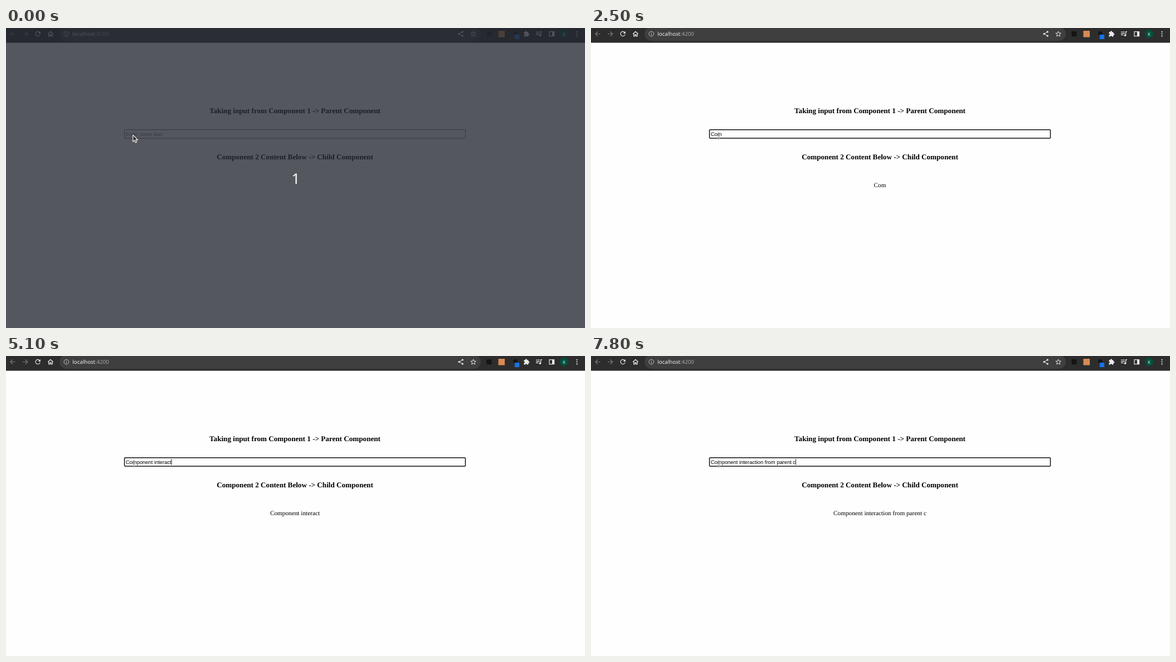
These frames come from a looping animation (1039 by 539 pixels, 8 s). An HTML page:

```html
<!DOCTYPE html>
<html lang="en">
<head>
<meta charset="utf-8">
<title>Component interaction</title>
<style>
html, body { margin: 0; width: 100%; height: 100%; overflow: hidden; background: #fefefe; }
svg { display: block; width: 1039px; height: 539px; }
text { text-rendering: geometricPrecision; white-space: pre; }
.head { font: bold 13.15px "Liberation Serif", "Times New Roman", serif; text-anchor: middle; }
.field { font: 9.38px "Liberation Sans", Arial, sans-serif; }
.copy { font: 11.26px "Liberation Serif", "Times New Roman", serif; text-anchor: middle; }
.ui { font-family: "Noto Sans", "Open Sans", sans-serif; }
.line { fill: none; stroke: #ececec; stroke-width: 1.2; }
.dim { stroke: #7b7b7b; }
.solid { fill: #ececec; }
</style>
</head>
<body>
<svg viewBox="0 0 1039 539" xmlns="http://www.w3.org/2000/svg">
  <rect width="1039" height="539" fill="#fefefe"/>

  <!-- toolbar -->
  <rect width="1039" height="26.5" fill="#2d2d2d"/>
  <rect x="96" y="-2" width="756" height="25" rx="12.5" fill="#3f3f3f"/>
  <path class="line dim" d="M16.5 10.5H8M12 6.5L8 10.5L12 14.5"/>
  <path class="line dim" d="M30 10.5H38.7M34.7 6.5L38.7 10.5L34.7 14.5"/>
  <path class="line" d="M60.7 8.4A4.1 4.1 0 1 0 61.1 11.6"/>
  <path class="solid" d="M61.8 5.8V10H57.6Z"/>
  <path class="line" d="M75.2 10.8L79.9 6.3L84.6 10.8M76.7 10V14.7H78.9V11.8H80.9V14.7H83.1V10"/>
  <g class="line" style="stroke:#c4c4c4;stroke-width:1">
    <circle cx="108.3" cy="10.6" r="4.3"/>
    <path d="M108.3 10V13M108.3 8V9"/>
  </g>
  <text class="ui" x="119.3" y="14" font-size="9.66" fill="#eeeeee">localhost<tspan fill="#a6a6a6">:4200</tspan></text>

  <path class="line" style="stroke-width:1" d="M819 7L813.3 10.5L819 14"/>
  <g class="solid">
    <circle cx="819.2" cy="6.9" r="1.6"/>
    <circle cx="813" cy="10.5" r="1.6"/>
    <circle cx="819.2" cy="14.1" r="1.6"/>
  </g>
  <path id="star" class="line" style="stroke-width:1;stroke-linejoin:round"/>

  <rect x="862.5" y="6" width="9" height="9" fill="#141414"/>
  <rect x="883.5" y="5" width="11.5" height="11.5" fill="#d98a55"/>
  <circle cx="914" cy="9.5" r="3.8" fill="#141414"/>
  <rect x="912.8" y="12" width="8.4" height="8" rx="1" fill="#1a73e8"/>

  <path class="solid" d="M929.4 7.2H932V6.6A1.4 1.4 0 0 1 934.8 6.6V7.2H937.4V9.8H938A1.4 1.4 0 0 1 938 12.6H937.4V15.4H934.9A1.5 1.5 0 0 0 931.9 15.4H929.4V12.8A1.5 1.5 0 0 0 929.4 9.8Z"/>
  <path class="line" d="M951 7H958M951 9.7H958M951 12.4H955.4M959.7 13.2V6.6H962"/>
  <circle class="solid" cx="958.4" cy="13.3" r="1.7"/>
  <rect class="line" x="975" y="6.6" width="8.6" height="8"/>
  <rect class="solid" x="980" y="6.6" width="3.6" height="8"/>
  <circle cx="1001.5" cy="10.6" r="7.6" fill="#00503f"/>
  <text class="ui" x="1001.5" y="13.5" font-size="8" fill="#e6eeeb" text-anchor="middle">K</text>
  <g class="solid">
    <circle cx="1024.5" cy="6.8" r="1.15"/>
    <circle cx="1024.5" cy="10.6" r="1.15"/>
    <circle cx="1024.5" cy="14.4" r="1.15"/>
  </g>

  <!-- page -->
  <text class="head" x="518.5" y="153.4">Taking input from Component 1 -&gt; Parent Component</text>
  <rect id="box" x="212.6" y="182.7" width="611.8" height="15.4" rx="1.4" fill="#fff"/>
  <text id="field" class="field" x="214.9" y="193.7" xml:space="preserve"></text>
  <rect id="caret" y="185" width="0.9" height="10.6" fill="#111"/>
  <text class="head" x="518.5" y="235.9">Component 2 Content Below -&gt; Child Component</text>
  <text id="copy" class="copy" x="518.5" y="286.2"></text>

  <g id="beam" fill="none">
    <path d="M227 188.8H231.8M229.4 188.8V199M227 199H231.8" stroke="#fff" stroke-width="2.2" opacity=".85"/>
    <path d="M227.2 188.8H231.6M229.4 188.8V199M227.2 199H231.6" stroke="#555" stroke-width=".9"/>
  </g>

  <!-- countdown -->
  <g id="intro">
    <rect width="1039" height="539" fill="rgb(36,40,48)" fill-opacity=".78"/>
    <text class="ui" x="520" y="279.8" font-size="26" fill="#fff" text-anchor="middle">1</text>
    <path d="M227.8 192.3V204.2L230.6 201.7L232.5 206L234.6 205.1L232.7 200.9H236.6Z" fill="#2b2b2b" stroke="#fff" stroke-width="1.1" stroke-linejoin="round"/>
  </g>
</svg>
<script>
const LOOP = 8000, FOCUS = 400, CARET_ON = 600;
const PHRASE = "Component interaction from parent c";
// [time, characters typed]
const KEYS = [
  [1200, 2], [1900, 3], [2600, 5],
  [2900, 6], [3000, 7], [3200, 8], [3300, 9], [3500, 10],
  [3800, 11], [4000, 13], [4100, 14], [4300, 15], [4600, 16], [4800, 17],
  [5100, 18], [5300, 19], [5400, 20], [5600, 21], [5800, 22], [6000, 23], [6100, 24],
  [6200, 25], [6400, 26], [6500, 27], [6700, 28], [6800, 29], [7000, 30], [7100, 31],
  [7300, 32], [7500, 33], [7600, 34], [7800, 35]
];
const $ = id => document.getElementById(id);
const box = $("box"), field = $("field"), caret = $("caret");
const copy = $("copy"), beam = $("beam"), intro = $("intro");
const show = (el, on) => el.setAttribute("visibility", on ? "visible" : "hidden");

function starPath(cx, cy, outer, inner) {
  let d = "";
  for (let i = 0; i < 10; i++) {
    const r = i % 2 ? inner : outer, a = i * Math.PI / 5;
    d += (i ? "L" : "M") + (cx + r * Math.sin(a)).toFixed(2) + " " + (cy - r * Math.cos(a)).toFixed(2);
  }
  return d + "Z";
}
$("star").setAttribute("d", starPath(838.6, 10.9, 5, 2.2));

function draw(t) {
  let last = FOCUS, count = 0;
  for (const [time, n] of KEYS) {
    if (time > t) break;
    last = time;
    count = n;
  }
  const focused = t >= FOCUS, typed = PHRASE.slice(0, count);

  show(intro, t < 100);
  show(beam, t >= 100);
  box.setAttribute("stroke", focused ? "#101010" : "#707070");
  box.setAttribute("stroke-width", focused ? 1.5 : 1);

  field.textContent = typed || "Enter some text";
  field.setAttribute("fill", typed ? "#000" : "#757575");
  copy.textContent = typed.trim();

  const width = typed ? field.getComputedTextLength() : 0;
  caret.setAttribute("x", 214.8 + width);
  show(caret, focused && t - last < CARET_ON);
}

let start = null;
function tick(now) {
  if (start === null) start = now;
  draw((now - start) % LOOP);
  requestAnimationFrame(tick);
}
draw(0);
requestAnimationFrame(tick);
</script>
</body>
</html>
```
